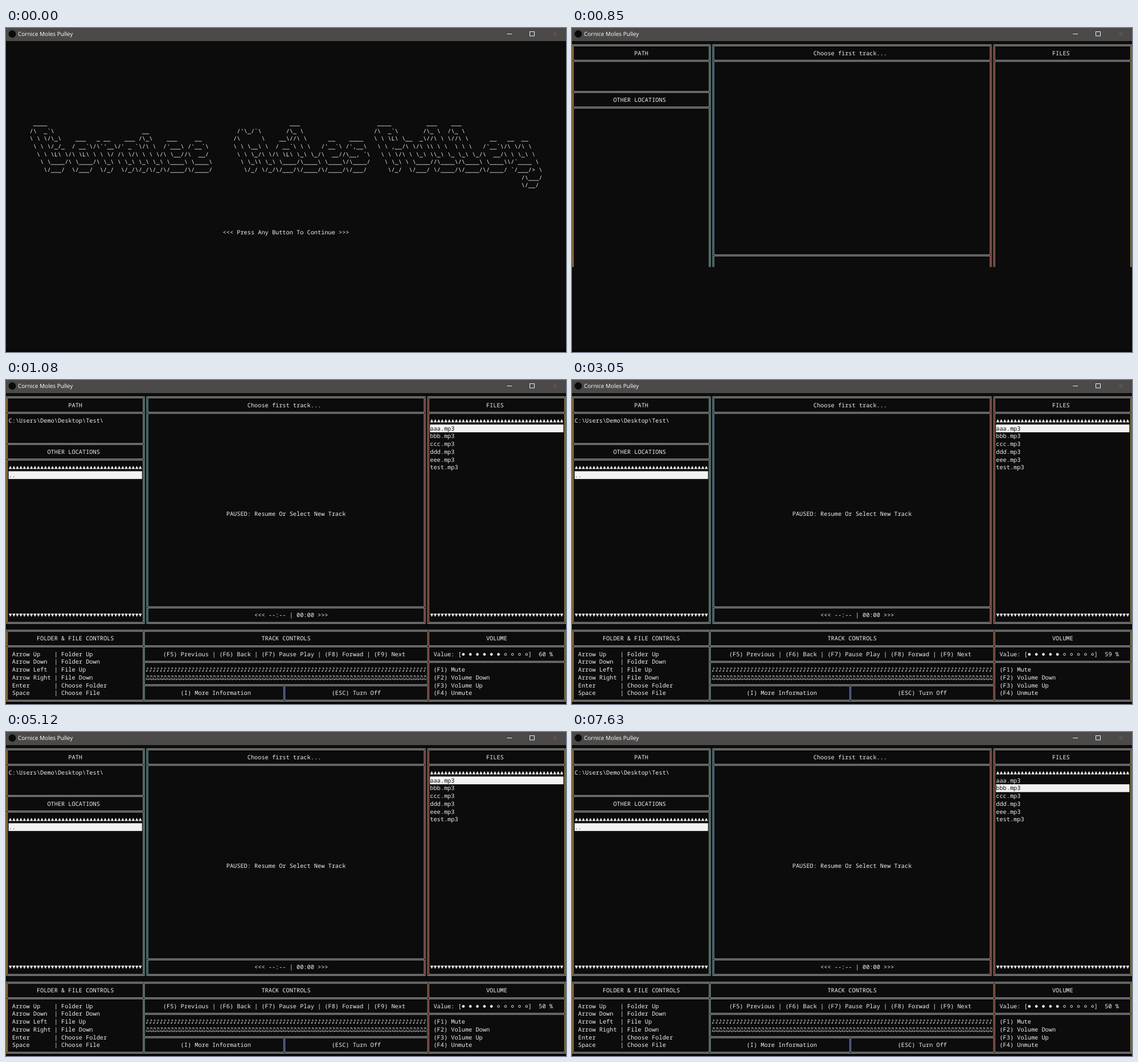
An HTML page with a canvas for the animation above (8 s loop, 983x570 px).

```html
<!DOCTYPE html>
<html lang="en">
<head>
<meta charset="utf-8">
<title>Cornice Moles Pulley</title>
<style>
html, body { margin: 0; width: 100%; height: 100%; overflow: hidden; background: #0c0c0c; }
canvas { display: block; }
</style>
</head>
<body>
<canvas id="stage" width="983" height="570"></canvas>
<script>
const ctx = document.getElementById('stage').getContext('2d', { alpha: false });
const LOOP = 8000, W = 983, H = 570;
const CELL_W = 6.164, CELL_H = 13.69;
const INK = '#f0f0f0', PAPER = '#0c0c0c';
const MONO = '10.27px "Noto Sans Mono", "DejaVu Sans Mono", monospace';
const NOTES = '10.24px "DejaVu Sans Mono", "Noto Sans Mono", monospace';
const APP = 'Cornice Moles Pulley';

// Centre of a console cell
const cellX = col => 1.5 + col * CELL_W;
const cellY = row => 30.4 + row * CELL_H;

// Letter shapes: "=letter first-row", with ~ standing for a backtick
const LETTERS = String.raw`
=C0
 ____
/\  _~\
\ \ \/\_\
 \ \ \/_/_
  \ \ \L\ \
   \ \____/
    \/___/
=M1
 /'\_/~\
/\      \
\ \ \__\ \
 \ \ \_/\ \
  \ \_\\ \_\
   \/_/ \/_/
=P0
 ____
/\  _~\
\ \ \L\ \
 \ \ ,__/
  \ \ \/
   \ \_\
    \/_/
=o2
  ___
 / __~\
/\ \L\ \
\ \____/
 \/___/
=r2
 _ __
/\~'__\
\ \ \/
 \ \_\
  \/_/
=n2
  ___
/' _ ~\
/\ \/\ \
\ \_\ \_\
 \/_/\/_/
=i1
 __
/\_\
\/\ \
 \ \ \
  \ \_\
   \/_/
=c2
  ___
 /'___\
/\ \__/
\ \____\
 \/____/
=e2
   __
 /'__~\
/\  __/
\ \____\
 \/____/
=l0
 ___
/\_ \
\//\ \
  \ \ \
   \_\ \_
   /\____\
   \/____/
=s2
  ____
 /',__\
/\__, ~\
\/\____/
 \/___/
=u2
 __  __
/\ \/\ \
\ \ \_\ \
 \ \____/
  \/___/
=y2
 __  __
/\ \/\ \
\ \ \_\ \
 \/~____ \
  ~/___/> \
     /\___/
     \/__/
`;

const glyphs = {};
for (const block of LETTERS.replaceAll('~', '\x60').trim().slice(1).split('\n=')) {
  const [head, ...lines] = block.split('\n');
  const rows = Array(9).fill('');
  lines.forEach((line, i) => rows[+head[1] + i] = line);
  glyphs[head[0]] = rows;
}

// Sets a word, letting neighbouring letters share one column where their strokes agree
function banner(word) {
  const out = Array.from({ length: 9 }, () => []);
  for (const letter of word) {
    const rows = glyphs[letter];
    const starts = rows.map(row => row.search(/\S/));
    let at = Math.max(0, ...rows.map((row, r) => row ? out[r].length - starts[r] : 0));
    const shares = at > 0 && rows.every((row, r) => {
      const old = out[r][at - 1 + starts[r]];
      return !row || !old || old === ' ' || old === '_' || old === row[starts[r]];
    });
    if (shares) at--;
    rows.forEach((row, r) => [...row].forEach((ch, i) => {
      if (ch !== ' ') {
        while (out[r].length < at + i) out[r].push(' ');
        out[r][at + i] = ch;
      }
    }));
  }
  return out.map(row => row.join(''));
}
const banners = APP.split(' ').map(banner);

function print(col, row, text, color = INK, font = MONO) {
  ctx.font = font;
  ctx.fillStyle = color;
  ctx.textAlign = 'left';
  const y = cellY(row) + 3.6;
  [...text].forEach((ch, i) => {
    if (ch !== ' ') ctx.fillText(ch, cellX(col + i) - CELL_W / 2, y);
  });
}

function line(x0, y0, x1, y1, color, width = 0.85) {
  ctx.strokeStyle = color;
  ctx.lineWidth = width;
  ctx.beginPath();
  ctx.moveTo(x0, y0);
  ctx.lineTo(x1, y1);
  ctx.stroke();
}

const EDGE = { 0: '#d9a05c', 39: '#a3c9b4', 40: '#86bccb', 79: '#7f9cf0', 119: '#e38c8a', 120: '#e08a68', 159: '#c2b46c' };

function box(c0, r0, c1, r1, inset) {
  const x0 = cellX(c0) + inset, x1 = cellX(c1) - inset;
  const y0 = cellY(r0) + inset, y1 = cellY(r1) - inset;
  line(x0, y0, x1, y0, '#e0e0e0');
  line(x0, y1, x1, y1, '#e0e0e0');
  line(x0, y0, x0, y1, EDGE[c0], 1);
  line(x1, y0, x1, y1, EDGE[c1], 1);
}

function panel(c0, r0, c1, r1, sections) {
  box(c0, r0, c1, r1, -1.03);
  for (const s of sections) box(...s, 1.03);
}

function arrows(col, row, dir) {
  ctx.fillStyle = INK;
  const y = cellY(row) + 0.2;
  for (let i = 0; i < 38; i++) {
    const x = cellX(col + i);
    ctx.beginPath();
    ctx.moveTo(x - 2.8, y + 2.8 * dir);
    ctx.lineTo(x + 2.8, y + 2.8 * dir);
    ctx.lineTo(x, y - 2.8 * dir);
    ctx.fill();
  }
}

function listItem(col, row, text, selected) {
  if (selected) {
    ctx.fillStyle = '#f2f2f2';
    ctx.fillRect(cellX(col) - CELL_W / 2, cellY(row) - CELL_H / 2, 38 * CELL_W, CELL_H);
  }
  print(col, row, text, selected ? PAPER : INK);
}

function titleBar() {
  ctx.fillStyle = '#4c4a48';
  ctx.fillRect(0, 0, W, 23);
  ctx.fillStyle = '#0a0a0a';
  ctx.beginPath();
  ctx.arc(11, 10.5, 6.5, 0, 7);
  ctx.fill();
  ctx.font = '10px "Open Sans", "Noto Sans", sans-serif';
  ctx.fillStyle = '#fff';
  ctx.fillText(APP, 21, 14.3);
  line(879.5, 10.5, 888, 10.5, '#f0f0f0', 1);
  ctx.strokeStyle = '#f0f0f0';
  ctx.strokeRect(919.5, 6.5, 8, 7.5);
  line(960, 6.5, 967.5, 14, '#865f5f', 0.9);
  line(967.5, 6.5, 960, 14, '#865f5f', 0.9);
}

function intro() {
  banners.forEach((rows, i) => rows.forEach((row, r) => print([7, 65, 105][i], 10 + r, row)));
  print(62, 24, '<<< Press Any Button To Continue >>>');
}

function layout() {
  panel(0, 0, 39, 29, [[0, 0, 39, 2], [0, 2, 39, 6], [0, 6, 39, 8], [0, 8, 39, 29]]);
  panel(40, 0, 119, 29, [[40, 0, 119, 2], [40, 2, 119, 27], [40, 27, 119, 29]]);
  panel(120, 0, 159, 29, [[120, 0, 159, 2], [120, 2, 159, 29]]);
  panel(0, 30, 159, 39, [
    [0, 30, 39, 32], [0, 32, 39, 39],
    [39, 30, 120, 32], [39, 32, 120, 34], [39, 34, 120, 37], [39, 37, 79, 39], [79, 37, 120, 39],
    [120, 30, 159, 32], [120, 32, 159, 34], [120, 34, 159, 39]
  ]);
  print(18, 1, 'PATH');
  print(69, 1, 'Choose first track...');
  print(137, 1, 'FILES');
  print(12, 7, 'OTHER LOCATIONS');
  print(9, 31, 'FOLDER & FILE CONTROLS');
  print(73, 31, 'TRACK CONTROLS');
  print(137, 31, 'VOLUME');
}

function controls() {
  ['Arrow Up    | Folder Up', 'Arrow Down  | Folder Down', 'Arrow Left  | File Up',
   'Arrow Right | File Down', 'Enter       | Choose Folder', 'Space       | Choose File']
    .forEach((text, i) => print(2, 33 + i, text));
  print(45, 33, '(F5) Previous | (F6) Back | (F7) Pause Play | (F8) Forwad | (F9) Next');
  print(40, 35, '♪'.repeat(80), INK, NOTES);
  print(40, 36, '♫'.repeat(80), INK, NOTES);
  print(50, 38, '(I) More Information');
  print(93, 38, '(ESC) Turn Off');
  ['Mute', 'Volume Down', 'Volume Up', 'Unmute']
    .forEach((text, i) => print(122, 35 + i, `(F${i + 1}) ${text}`));
}

function files(t) {
  arrows(121, 3, 1);
  const selected = t < 7610 ? 0 : t < 7630 ? -1 : 1;
  ['aaa', 'bbb', 'ccc', 'ddd', 'eee', 'test']
    .forEach((name, i) => listItem(121, 4 + i, name + '.mp3', i === selected));
  arrows(121, 28, -1);
}

const VOLUME_DROPS = [3050, 3250, 3520, 3730, 3900, 4070, 4310, 4520, 4740, 5120];

function volume(t) {
  const value = 60 - VOLUME_DROPS.filter(at => t >= at).length;
  print(122, 33, 'Value: [');
  for (let i = 0; i < 10; i++) {
    const full = i < Math.floor(value / 10);
    ctx.beginPath();
    ctx.arc(cellX(130 + 2 * i), cellY(33) + 0.5, full ? 2.4 : 1.9, 0, 7);
    ctx.fillStyle = ctx.strokeStyle = INK;
    ctx.lineWidth = 0.9;
    full ? ctx.fill() : ctx.stroke();
  }
  print(149, 33, `]  ${value} %`);
}

// Last console row printed from each moment on
const REVEAL = [[720, 5], [750, 11], [780, 16], [820, 22], [850, 28], [870, 32], [900, 37], [930, 40]];

function player(t) {
  const last = REVEAL.filter(step => t >= step[0]).pop()[1];
  const bottom = cellY(last) + CELL_H / 2;
  ctx.save();
  ctx.beginPath();
  ctx.rect(0, 0, 738, bottom);
  ctx.rect(738, 0, W - 738, last === 5 ? bottom - CELL_H : bottom);
  ctx.clip();
  layout();
  ctx.restore();

  if (t >= 930) controls();
  if (t >= 960) {
    print(1, 3, 'C:\\Users\\Demo\\Desktop\\Test\\');
    arrows(1, 9, 1);
    listItem(1, 10, '..', true);
  }
  if (t >= 980) arrows(1, 28, -1);
  if (t >= 1010) files(t);
  if (t >= 1040) volume(t);
  if (t >= 1080) {
    print(63, 15, 'PAUSED: Resume Or Select New Track');
    print(71, 28, '<<< --:-- | 00:00 >>>');
  }
}

function draw(t) {
  ctx.fillStyle = PAPER;
  ctx.fillRect(0, 0, W, H);
  ctx.fillStyle = '#060606';
  ctx.fillRect(0, 566, W, 4);
  titleBar();
  t < 720 ? intro() : player(t);
}

ctx.textRendering = 'geometricPrecision';
const start = performance.now();
function tick() {
  draw((performance.now() - start) % LOOP);
  requestAnimationFrame(tick);
}
tick();
</script>
</body>
</html>
```
